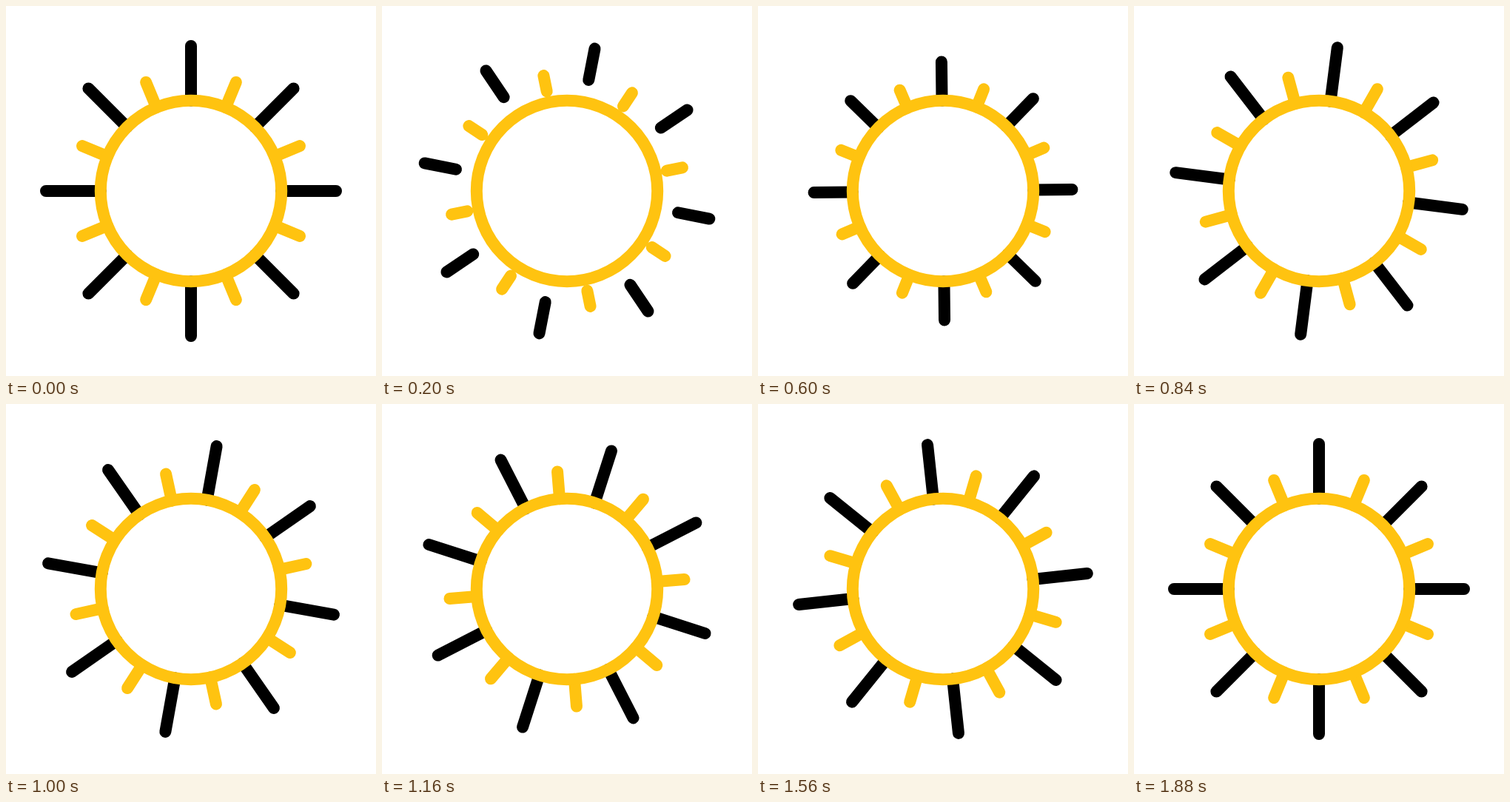
An HTML page with a canvas for the animation above (2000 ms loop, 500x500 px).

```html
<!DOCTYPE html>
<html lang="en">
<head>
<meta charset="utf-8">
<title>Sun</title>
<style>
html, body { margin: 0; height: 100%; overflow: hidden; background: #fff; }
canvas { display: block; width: 500px; height: 500px; }
</style>
</head>
<body>
<canvas id="stage" width="500" height="500"></canvas>
<script>
const ctx = document.getElementById('stage').getContext('2d');
const LOOP = 2000, STEP = 40;
const RING = 122.2, GAP = 0.8;
const YELLOW = '#ffc310';

// Cubic easing with handles (a, 0) and (b, 1)
function ease(x, a, b) {
  if (x <= 0) return 0;
  if (x >= 1) return 1;
  let lo = 0, hi = 1;
  for (let i = 0; i < 30; i++) {
    const s = (lo + hi) / 2, r = 1 - s;
    if (3 * a * s * r * r + 3 * b * s * s * r + s * s * s < x) lo = s;
    else hi = s;
  }
  return lo * lo * (3 - 2 * lo);
}

// Degrees turned: two swings adding up to a quarter turn
const turn = t =>
  52.35 * ease(t / 860, 0.23, 0.57) + 37.65 * ease((t - 860) / 1000, 0.27, 0.585);

// How far the rays have shot outward, in ray lengths
const shift = t => (1 + GAP) * ease(t / 890, 0.19, 0.55);

function segment(angle, from, to) {
  const x = Math.sin(angle), y = -Math.cos(angle);
  ctx.moveTo(x * from, y * from);
  ctx.lineTo(x * to, y * to);
}

function rays(color, offset, tip, t) {
  const p = shift(t), len = tip - RING;
  ctx.strokeStyle = color;
  ctx.beginPath();
  for (let i = 0; i < 8; i++) {
    const angle = (turn(t) + offset + i * 45) * Math.PI / 180;
    if (p < 1) segment(angle, RING + len * p, tip);
    if (p > GAP) segment(angle, RING, RING + len * (p - GAP));
  }
  ctx.stroke();
}

function draw(now) {
  const t = Math.floor((now % LOOP) / STEP) * STEP;
  ctx.setTransform(1, 0, 0, 1, 0, 0);
  ctx.fillStyle = '#fff';
  ctx.fillRect(0, 0, 500, 500);
  ctx.translate(250, 250);
  ctx.lineWidth = 16;
  ctx.lineCap = 'round';
  rays('#000', 0, 196, t);
  rays(YELLOW, 22.5, 159.1, t);
  ctx.beginPath();
  ctx.arc(0, 0, RING, 0, Math.PI * 2);
  ctx.stroke();
}

const start = performance.now();
function tick() {
  draw(performance.now() - start);
  requestAnimationFrame(tick);
}
tick();
</script>
</body>
</html>
```
